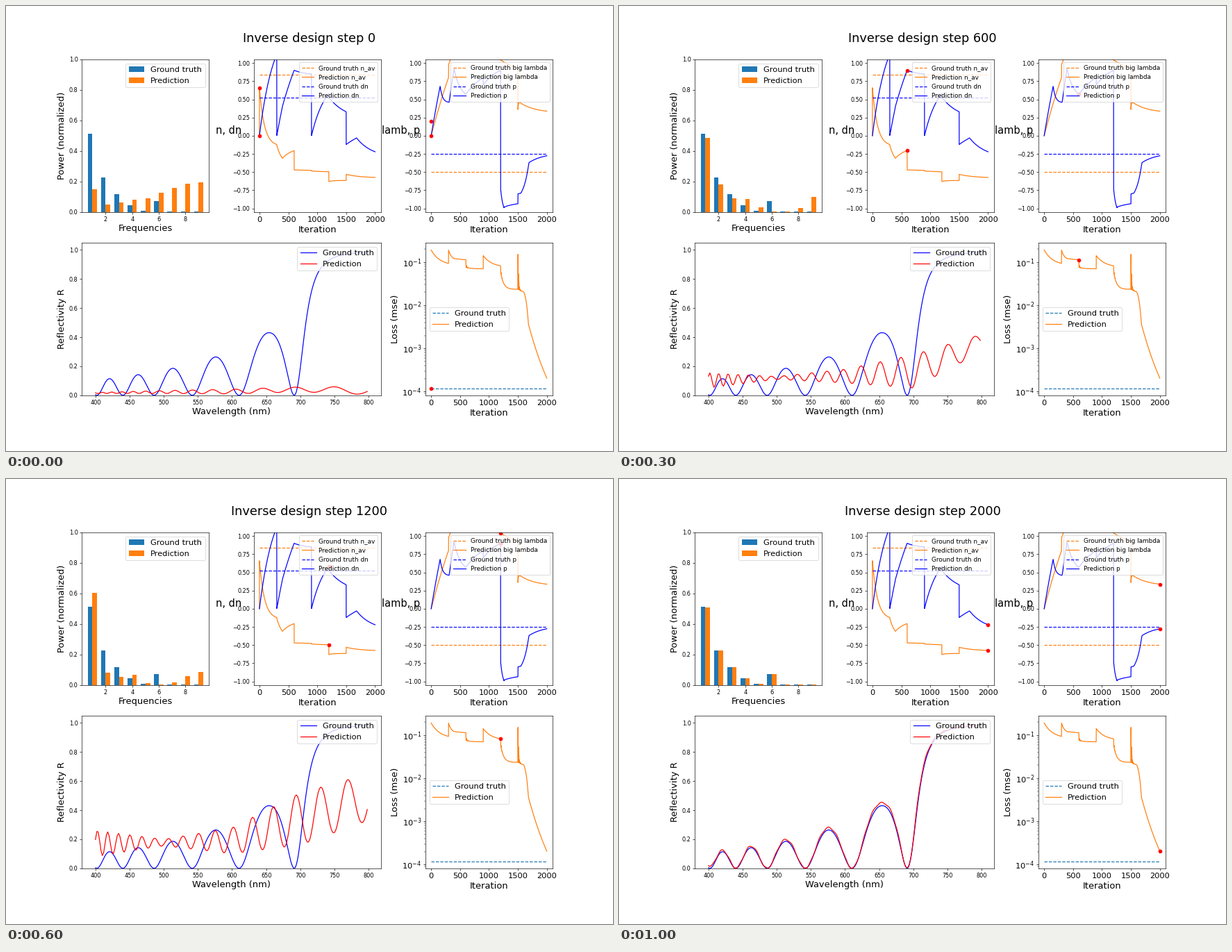
Write a matplotlib script that moves like this. It is 874 px wide and 641 px high and loops after 1.1 s.

```python
import numpy as np
import matplotlib.pyplot as plt
from matplotlib.animation import FuncAnimation

W, H, DPI = 874, 641, 58.27
BLUE, ORANGE = "tab:blue", "tab:orange"
STEP, FRAMES, INTERVAL = 200, 11, 100
GOAL = 1.18e-4

plt.rcParams.update({"font.family": "DejaVu Sans", "font.size": 10})

# Reflectivity spectra over wavelength in nm
wl = np.arange(400, 800, 2)
wave = 1000 / wl


def grating(edge, slope, curve, strength):
    """Coupled-mode reflectivity; the first zero lies at the wavelength edge."""
    u = wave - 1000 / edge
    m = np.sqrt(1 + slope * u + curve * u * u + 0j)
    k = np.maximum(strength, strength - 8 + 5.6 * m.real)
    q = k * np.sinc(m).real ** 2
    return q / (1 + q)


def fringes(peak, rate, chirp, low, high):
    """Interference between two envelopes given at every 100 nm."""
    u = wave - 1000 / peak
    knots = np.linspace(400, 800, len(low))
    lo, hi = np.interp(wl, knots, low), np.interp(wl, knots, high)
    phase = rate * u + chirp * u * u
    return lo + (hi - lo) * (0.5 + 0.5 * np.cos(2 * np.pi * phase))


truth = grating(691, 11.6, 21.2, 16)
fitted = np.abs(truth + 0.08 * truth * (1 - truth)
                + 0.005 * np.sin(wl * 2 * np.pi / 13)
                + 0.02 * np.exp((400 - wl) / 8))
ripple = 0.006 * np.sin(wl * 2 * np.pi / 12)

known = [0, 200, 600, 800, 1200, 1600, 2000]
spectra = [
    fringes(749, 8.89, 1.8, [.013, .013, .01, .025, .005],
            [.02, .033, .042, .058, .06]),
    fringes(779.5, 12.59, -.86, [.09, .04, .035, .06, .09],
            [.17, .27, .365, .44, .66]),
    fringes(790, 15.11, -.98, [.05, .11, .085, .05, .3],
            [.155, .13, .18, .28, .42]),
    fringes(787, 14.45, -.56, [.1, .15, .03, .2, .45],
            [.17, .3, .5, .6, .7]),
    fringes(769.5, 14.26, -1.33, [.08, .155, .1, .16, .33],
            [.262, .2, .28, .52, .65]),
    np.abs(grating(682, 7.2, 9.8, 12.5) + ripple),
    fitted]

# Power of the nine frequencies
freq = np.arange(1, 10)
power = np.array([.515, .228, .117, .047, .01, .073, .006, .003, .003])


def profile(head, decay, bump, centre, tail, width):
    """Decaying low end, a bump in the middle and a tail at the high end."""
    return (head * decay ** (freq - 1) + bump * np.exp(-(freq - centre) ** 2)
            + tail * np.exp(-((9 - freq) / width) ** 2))


guess = [profile(.14, .2, .03, 3.5, .195, 4.5),
         profile(.323, .28, .04, 3.7, .205, 1.7),
         profile(.485, .37, .06, 4, .098, .9),
         profile(.665, .18, .07, 3.4, .025, 1.2),
         profile(.605, .13, .075, 3.7, .085, 1.6),
         profile(.385, .25, .22, 2.6, .005, 1),
         power * .99]


def blend(rows, step):
    i = min(np.searchsorted(known, step, "right") - 1, len(known) - 2)
    w = ((step - known[i]) / (known[i + 1] - known[i])) ** 0.5
    return rows[i] * (1 - w) + rows[i + 1] * w


# Training histories
LAST = 2000
t = np.arange(LAST + 1)


def history(*parts):
    """Join eased parts, each (begin, from, to, bend)."""
    y = np.zeros(len(t))
    ends = [part[0] for part in parts[1:]] + [LAST]
    for (t0, y0, y1, bend), t1 in zip(parts, ends):
        on = (t >= t0 if t0 == 0 else t > t0) & (t <= t1)
        x = (t[on] - t0) / (t1 - t0)
        y[on] = y0 + (y1 - y0) * np.expm1(-bend * x) / np.expm1(-bend)
    return y


def ringing(begin, size):
    dt = t - begin - 1
    wave_up = np.maximum(np.cos(2 * np.pi * dt / 8), 0)
    return np.where(dt >= 0, size * np.exp(-np.abs(dt) / 10) * wave_up, 0)


n_av = history((0, .66, -.12, 3.5), (300, -.13, -.31, 1), (398, -.31, -.205, 1.2),
               (600, -.47, -.475, 1), (900, -.485, -.495, 1),
               (1200, -.63, -.615, 5), (1500, -.53, -.573, 2))
dn = history((0, 0, 1.12, 1.2), (300, 0, .41, .1), (400, .41, .9, .3),
             (600, .9, .85, 1.5), (900, 0, .58, 1.2), (1200, .53, .33, 1),
             (1500, -.12, -.03, .3), (1680, -.03, -.22, 1.2))
lamb = history((0, 0, .8, .3), (300, .98, 1.02, .1), (325, 1.2, 1.2, 1),
               (1190, 1.05, .93, 1), (1500, .34, .455, 8),
               (1540, .455, .338, 1.8))
p = history((0, 0, .68, .2), (155, .68, .46, 3.8), (310, .46, .92, .1),
            (395, .92, .57, 1.8), (600, .57, .8, .8), (900, .7, .9, 1),
            (1200, -.72, -.99, 1.5), (1260, -.98, -.935, 1),
            (1500, -.8, -.79, 1), (1550, -.79, -.37, -1.5),
            (1690, -.37, -.275, 1.2))
loss = 10 ** (history((0, -.72, -1.03, 2), (300, -.72, -.92, 2),
                      (400, -.92, -.947, .1), (600, -1.12, -1.155, 4),
                      (900, -.85, -1.086, 2), (1200, -1.22, -1.63, 6),
                      (1500, -1.62, -1.69, 1), (1600, -1.69, -2.43, -2),
                      (1680, -2.43, -3.69, .5))
              + ringing(600, .1) + ringing(1200, .1) + ringing(1500, .8))

# Layout
fig = plt.figure(figsize=(W / DPI, H / DPI), dpi=DPI, facecolor="white")
grid = fig.add_gridspec(2, 3, left=.125, right=.9005, bottom=.125, top=.88,
                        wspace=.35, hspace=.2)
title = fig.suptitle("", y=.94, fontsize=22)


def iteration_axes(cell):
    ax = fig.add_subplot(cell)
    ax.set_xticks(range(0, LAST + 1, 500))
    ax.tick_params(axis="x", labelsize=14)
    ax.set_xlabel("Iteration", fontsize=16)
    ax.set_xlim(-100, 2100)
    return ax


def level(ax, value, color, label):
    ax.plot([0, LAST], [value, value], "--", color=color, label=label)


def parameter_axes(cell, ylabel, tracks):
    ax = iteration_axes(cell)
    for name, goal, values, color in tracks:
        level(ax, goal, color, "Ground truth " + name)
        ax.plot(np.r_[0, t], np.r_[0, values], color=color,
                label="Prediction " + name)
    ax.set_yticks(np.arange(-1, 1.01, .25))
    ax.set_ylim(-1.05, 1.05)
    ax.set_ylabel(ylabel, fontsize=18, rotation=0, labelpad=6.5)
    ax.legend(loc="upper right", fontsize=11)
    return ax


ax = fig.add_subplot(grid[0, 0])
ax.bar(freq - .175, power, .35, color=BLUE, label="Ground truth")
bars = ax.bar(freq + .175, guess[0], .35, color=ORANGE, label="Prediction")
ax.set_xticks([2, 4, 6, 8])
ax.set_xlim(.215, 9.785)
ax.set_ylim(0, 1)
ax.set_xlabel("Frequencies", fontsize=16, labelpad=3)
ax.set_ylabel("Power (normalized)", fontsize=16)
ax.legend(loc="upper right", fontsize=14)

ax_n = parameter_axes(grid[0, 1], "n, dn", [("n_av", .835, n_av, ORANGE),
                                            ("dn", .52, dn, "blue")])
ax_l = parameter_axes(grid[0, 2], "lamb, p",
                      [("big lambda", -.5, lamb, ORANGE),
                       ("p", -.25, p, "blue")])

ax = fig.add_subplot(grid[1, :2])
ax.plot(wl, truth, color="blue", label="Ground truth")
spectrum, = ax.plot(wl, spectra[0], color="red", label="Prediction")
ax.set_xlim(380.1, 817.9)
ax.set_ylim(0, 1.05)
ax.set_xlabel("Wavelength (nm)", fontsize=16, labelpad=3)
ax.set_ylabel("Reflectivity R", fontsize=16)
ax.legend(loc="upper right", fontsize=14)

ax_e = iteration_axes(grid[1, 2])
level(ax_e, GOAL, BLUE, "Ground truth")
ax_e.plot(t, loss, color=ORANGE, label="Prediction")
ax_e.set_yscale("log")
ax_e.set_ylim(10 ** -4.088, 10 ** -.55)
ax_e.tick_params(axis="y", labelsize=14)
ax_e.set_ylabel("Loss (mse)", fontsize=16)
ax_e.legend(loc="center left", fontsize=14)

# Axes, history and value of each marker before the first update
tracked = [(ax_n, n_av, .66), (ax_n, dn, 0), (ax_l, lamb, .195),
           (ax_l, p, 0), (ax_e, loss, GOAL)]
dots = [a.plot([0], [first], "ro")[0] for a, _, first in tracked]


def update(i):
    step = i * STEP
    title.set_text(f"Inverse design step {step}")
    for bar, h in zip(bars, blend(guess, step)):
        bar.set_height(h)
    spectrum.set_ydata(blend(spectra, step))
    for dot, (_, values, first) in zip(dots, tracked):
        dot.set_data([step], [values[step] if step else first])
    return [title, spectrum, *bars, *dots]


anim = FuncAnimation(fig, update, frames=FRAMES, interval=INTERVAL,
                     repeat=True, blit=False)
plt.show()
```
